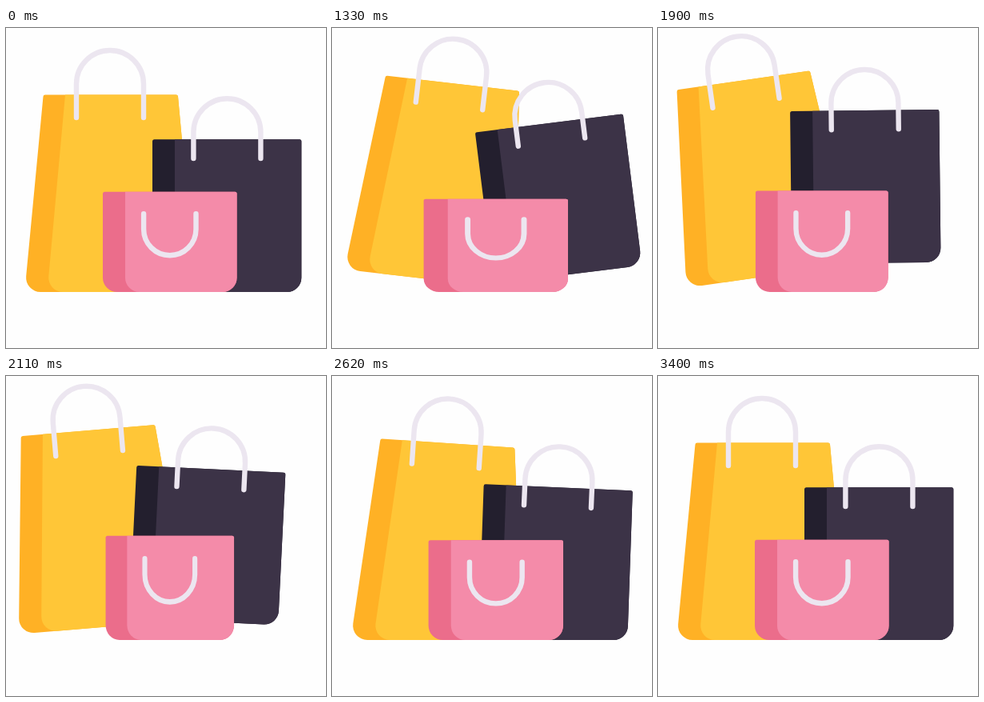
Recreate the animation shown at these times as an HTML page with a canvas. Size 400x400 px, loop 3.43 s.

```html
<!DOCTYPE html>
<html lang="en">
<head>
<meta charset="utf-8">
<title>Shopping bags</title>
<style>
  html, body { margin: 0; width: 100%; height: 100%; overflow: hidden; background: #fefefe; }
  canvas { display: block; width: 400px; height: 400px; }
</style>
</head>
<body>
<canvas id="stage"></canvas>
<script>
const LOOP = 3430, FLOOR = 330, HINGE = 290;
const canvas = document.getElementById('stage');
const ctx = canvas.getContext('2d');
const dpr = window.devicePixelRatio || 1;
canvas.width = canvas.height = 400 * dpr;

// Monotone cubic through [time, value] keys, flat at both ends and at every peak.
function track(...keys) {
  const grade = i => (keys[i + 1][1] - keys[i][1]) / (keys[i + 1][0] - keys[i][0]);
  const slopes = keys.map((_, i) => {
    if (!i || i === keys.length - 1) return 0;
    const a = grade(i - 1), b = grade(i);
    return a * b > 0 ? 2 * a * b / (a + b) : 0;
  });
  return t => {
    if (t <= keys[0][0]) return keys[0][1];
    const n = keys.findIndex(k => k[0] > t);
    if (n < 0) return keys[keys.length - 1][1];
    const [t0, v0] = keys[n - 1], [t1, v1] = keys[n];
    const d = t1 - t0, u = (t - t0) / d, w = 1 - u;
    return v0 * w * w * (1 + 2 * u) + v1 * u * u * (1 + 2 * w)
      + d * u * w * (slopes[n - 1] * w - slopes[n] * u);
  };
}

const still = () => 0;

// top/bottom: left, fold and right x; mid: pivot of the whole-bag turn
const yellow = {
  top: [46.7, 74, 214.8], bottom: [23.3, 51.5, 237.5], y: 83.5, mid: [130, 207],
  shade: '#ffb125', face: '#ffc637',
  handle: { x: 130, r: 42, y: 70, end: 112, up: true },
  turn: track([1000, 0], [1200, 10.8], [1330, 6.6], [1720, -9.8], [2110, -4.8], [2460, 0]),
  dx: track([1000, 0], [1180, -2], [1330, 5.6], [1720, 24.7], [2010, -21], [2110, -18], [2460, 0]),
  dy: track([1000, 0], [1200, -12.5], [1330, -15.2], [1620, -20.4], [1720, -20.4], [2110, -15.8], [2460, 0]),
  sway: track([2150, 0], [2620, 3.8], [2690, 4.1], [3280, 0]),
  squash: still
};

const dark = {
  top: [183, 211, 369.3], bottom: [183, 211, 369.3], y: 139.2, mid: [276.4, 235],
  shade: '#231f2e', face: '#3c3347',
  handle: { x: 276.4, r: 42, y: 130.2, end: 163, up: true },
  turn: track([1030, 0], [1330, -7.1], [1480, -8.5], [1720, -5], [2110, 2.8], [2460, 0]),
  dx: track([1030, 0], [1330, 7], [1450, 8], [1720, -6], [2110, -24.5], [2460, 0]),
  dy: track([1030, 0], [1330, -21], [1720, -42.3], [2110, -23], [2460, 0]),
  sway: track([2150, 0], [2620, 2.5], [2700, 2.9], [3280, 0]),
  squash: still
};

const pink = {
  top: [121, 149, 288.6], bottom: [121, 149, 288.6], y: 204.7, mid: [204.8, FLOOR],
  shade: '#eb6d8b', face: '#f48ba9',
  handle: { x: 204.8, r: 32.7, y: 251.5, end: 232.3, up: false },
  turn: still, dx: still, dy: still, sway: still,
  squash: track([1030, 0], [1360, .078], [1720, .035], [2080, -.043], [2620, .005], [2900, 0])
};

const rad = deg => deg * Math.PI / 180;

function rotate([x, y], cx, a) {
  const s = Math.sin(a), c = Math.cos(a);
  x -= cx;
  y -= HINGE;
  return [cx + x * c - y * s, HINGE + x * s + y * c];
}

// Filled polygon; each point is [x, y] with its own corner radius.
function fillRounded(points, radii, color) {
  const last = points[points.length - 1], first = points[0];
  ctx.beginPath();
  ctx.moveTo((last[0] + first[0]) / 2, (last[1] + first[1]) / 2);
  points.forEach((p, i) => {
    ctx.arcTo(...p, ...points[(i + 1) % points.length], radii[i]);
  });
  ctx.closePath();
  ctx.fillStyle = color;
  ctx.fill();
}

function drawHandle({ x, r, y, end, up }, cx, sway) {
  ctx.save();
  ctx.translate(cx, HINGE);
  ctx.rotate(sway);
  ctx.translate(-cx, -HINGE);
  ctx.beginPath();
  ctx.moveTo(x - r, end);
  ctx.arc(x, y, r, Math.PI, 0, !up);
  ctx.lineTo(x + r, end);
  ctx.lineWidth = 6.4;
  ctx.lineCap = 'round';
  ctx.strokeStyle = '#ece6f0';
  ctx.stroke();
  ctx.restore();
}

function drawBag(bag, t) {
  const [cx, cy] = bag.mid, k = bag.squash(t), sway = rad(bag.sway(t));
  const [tl, tf, tr] = bag.top.map(x => rotate([x, bag.y], cx, sway));
  const [bl, bf, br] = bag.bottom.map(x => [x, FLOOR]);
  ctx.save();
  ctx.translate(cx + bag.dx(t), cy + bag.dy(t));
  ctx.rotate(rad(bag.turn(t)));
  ctx.scale(1 + k, 1 - .94 * k);
  ctx.translate(-cx, -cy);
  fillRounded([tl, tr, br, bl], [2.5, 2.5, 18, 18], bag.shade);
  fillRounded([tf, tr, br, bf], [0, 2.5, 18, 18], bag.face);
  drawHandle(bag.handle, cx, sway);
  ctx.restore();
}

const start = performance.now();

function frame() {
  const t = (performance.now() - start) % LOOP;
  ctx.setTransform(dpr, 0, 0, dpr, 0, 0);
  ctx.fillStyle = '#fefefe';
  ctx.fillRect(0, 0, 400, 400);
  [yellow, dark, pink].forEach(bag => drawBag(bag, t));
  requestAnimationFrame(frame);
}
frame();
</script>
</body>
</html>
```
